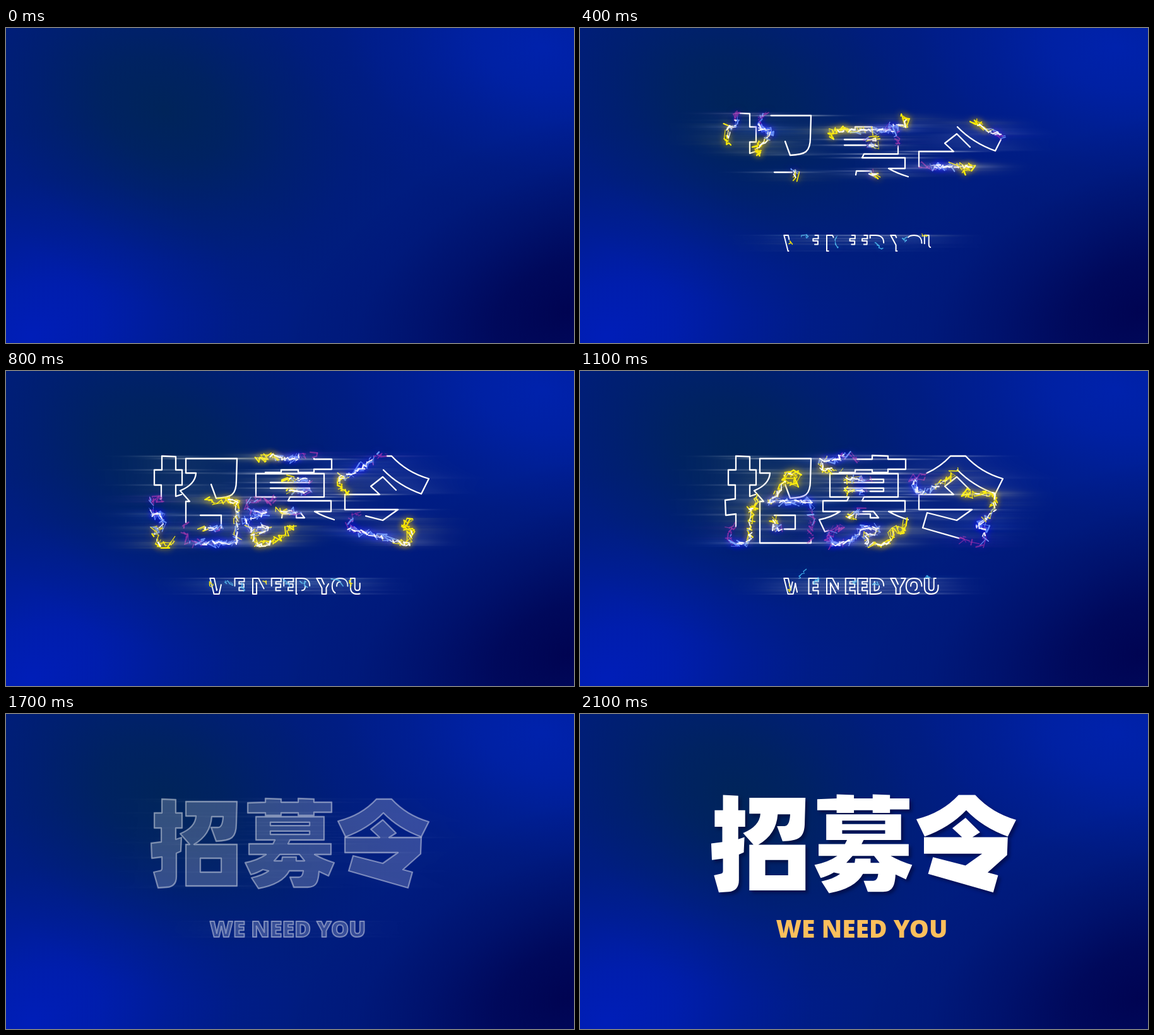
Recreate the animation shown at these times as an HTML page with a canvas. Size 900 px wide and 500 px high, loop 3.1 s.

```html
<!DOCTYPE html>
<html lang="zh">
<head>
<meta charset="utf-8">
<title>招募令</title>
<style>
  html, body { margin: 0; width: 100%; height: 100%; overflow: hidden; background: #001c80; }
  canvas, svg { position: absolute; left: 0; top: 0; }
  #rays { filter: url(#smear); mix-blend-mode: screen; }
</style>
</head>
<body>
<svg width="0" height="0">
  <filter id="smear" color-interpolation-filters="sRGB">
    <feGaussianBlur stdDeviation="38 0.4"/>
  </filter>
</svg>
<canvas id="stage" width="900" height="500" role="img" aria-label="招募令 WE NEED YOU"></canvas>
<canvas id="rays" width="900" height="500"></canvas>
<script>
const LOOP = 3100, STEP = 100, BOLT = 0.34;
const ctx = document.getElementById('stage').getContext('2d');
const rays = document.getElementById('rays').getContext('2d');
const ink = new OffscreenCanvas(900, 500).getContext('2d');
const clamp = v => Math.max(0, Math.min(1, v));

// Each outline starts where its stroke starts to be drawn.
const contours = [
  // 招
  'M278 196L269 199V181H279V157H269V136L247 135V157H235V181H246V203L230 205L231 229L247 227V245Q247 249 243 249L234 251L241 276L255 275Q270 274 270 258V221L277 218Z',
  'M325 180L333 202C357 201 365 197 365 174L366 139H285V162H301Q300 180 276 190L291 207H285V273H366V207H298Q324 192 326 163H344Q343 180 336 180Z',
  'M308 229H341V251H308Z',
  // 募
  'M411 161H436V157H463V161H488V156H516V140H488V135L463 134V140H436V135L411 134V140L383 141V157H411Z',
  'M520 236Q503 231 489 223H515V206H447L450 200H504V163H396V200H426L423 206H385V223H412Q399 232 379 236L388 255Q399 252 407 247L416 249Q407 256 389 260L400 277Q438 270 449 249H471Q470 259 464 259H450L456 275H478C492 275 495 266 496 250L511 257Z',
  'M419 177H481V172H419Z',
  'M419 186H481V191H419Z',
  'M437 233L438 227H460V233H473L465 223H434L425 233Z',
  // 令
  'M598 157Q622 182 658 195L670 171Q635 161 611 135H587Q563 161 526 170L538 195Q574 182 598 157Z',
  'M618 189L597 168L578 183L592 196H537V220H621L597 237L550 225L543 249L637 276L644 251L629 247L657 222L658 196H607Z'
].map(d => {
  const node = document.createElementNS('http://www.w3.org/2000/svg', 'path');
  node.setAttribute('d', d);
  return { node, path: new Path2D(d), length: node.getTotalLength() };
});
const title = new Path2D();
contours.forEach(c => title.addPath(c.path));

function randomizer(seed) {
  return () => {
    seed = (seed * 1664525 + 1013904223) >>> 0;
    return seed / 4294967296;
  };
}

function lobe(x, y, rx, ry, angle, rgb) {
  ctx.save();
  ctx.translate(x, y);
  ctx.rotate(angle);
  ctx.scale(rx, ry);
  const g = ctx.createRadialGradient(0, 0, 0, 0, 0, 1);
  [1, 0.8, 0.42, 0.12, 0].forEach((a, i) => g.addColorStop(i / 4, `rgba(${rgb},${a})`));
  ctx.fillStyle = g;
  ctx.fillRect(-1, -1, 2, 2);
  ctx.restore();
}

function background() {
  ctx.fillStyle = '#001c80';
  ctx.fillRect(0, 0, 900, 500);
  lobe(40, 490, 450, 320, -0.35, '0,30,184');
  lobe(850, 30, 430, 270, 0.2, '0,34,172');
  lobe(250, 130, 410, 300, 0.5, '0,36,90');
  lobe(890, 450, 470, 300, -0.35, '0,4,82');
}

function segment(a, b, color, width, glow) {
  ink.strokeStyle = color;
  ink.lineWidth = width;
  ink.shadowColor = glow;
  ink.shadowBlur = 12;
  ink.beginPath();
  ink.moveTo(...a);
  ink.lineTo(...b);
  ink.stroke();
}

// Colour runs from violet at the tail through blue to yellow at the tip.
function boltColor(u) {
  if (u < 0.22) return ['rgba(165,50,165,.65)', '#5020c0'];
  if (u < 0.6) return ['rgba(110,160,255,.9)', '#3038ff'];
  return ['#fff000', '#d0b000'];
}

function bolt({ node, length }, front, span, rnd) {
  const end = Math.min(1, front + span) * length;
  for (let strand = 0; strand < 5; strand++) {
    const core = strand > 2;
    const spread = core ? 6 : 7 + strand * 4;
    let last = null;
    for (let d = front * length; d < end; d += 2.5 + rnd() * 3.5) {
      const p = node.getPointAtLength(d);
      const next = [p.x + (rnd() - 0.5) * spread, p.y + (rnd() - 0.5) * spread];
      const u = (d / length - front) / span;
      const [color, glow] = boltColor(u + (rnd() - 0.5) * 0.3);
      const visible = core ? u > 0.25 && u < 0.85 && rnd() < 0.6
                           : rnd() < (u < 0.22 ? 0.55 : 0.82);
      if (last && visible) segment(last, next, core ? '#fff' : color, 0.7 + rnd() * 1.8, glow);
      last = next;
    }
  }
}

function textSparks(t, rnd) {
  for (const x of [326, 346, 372, 400, 432, 463, 514, 545]) {
    if (rnd() < 0.2) continue;
    const color = t >= 1300 || rnd() < 0.4 ? '#f0d800' : 'rgba(70,185,240,.85)';
    let last = [x + rnd() * 8, 328 + rnd() * 14];
    for (let i = 0; i < 7; i++) {
      const next = [last[0] + (rnd() - 0.4) * 8, last[1] + (rnd() - 0.4) * 9];
      if (next[1] > 360) break;
      segment(last, next, color, 0.8 + rnd(), '#1870c0');
      last = next;
    }
  }
}

function slogan(target, method, size, baseline) {
  target.font = `800 ${size}px "Open Sans", "Noto Sans", sans-serif`;
  target.textAlign = 'center';
  target[method]('WE NEED YOU', 446.5, baseline);
}

function finished() {
  ctx.save();
  ctx.shadowColor = 'rgba(0,0,40,.5)';
  ctx.shadowBlur = 5;
  ctx.shadowOffsetX = ctx.shadowOffsetY = 4;
  ctx.translate(450, 206.5);
  ctx.scale(1.098, 1.098);
  ctx.translate(-450.5, -206);
  ctx.fillStyle = '#fff';
  ctx.fill(title, 'evenodd');
  ctx.restore();
  ctx.fillStyle = '#fbbf5c';
  slogan(ctx, 'fillText', 39, 355);
}

function drawInk(t) {
  const front = clamp(0.02 + 0.00058 * t);
  const span = Math.min(BOLT, t * 0.00042);
  ink.clearRect(0, 0, 900, 500);
  ink.save();
  ink.lineJoin = ink.lineCap = 'round';
  ink.strokeStyle = '#fff';
  ink.globalAlpha = clamp(1 - (t - 1310) * 0.0015);
  ink.lineWidth = 2.3;
  for (const c of contours) {
    ink.setLineDash(front < 1 ? [c.length * front, c.length] : []);
    ink.stroke(c.path);
  }
  ink.lineWidth = 2;
  ink.setLineDash(t < 1300 ? [front * 160, 999] : []);
  ink.lineDashOffset = -50 * clamp((1300 - t) / 900);
  slogan(ink, 'strokeText', 35.5, 354);

  ink.setLineDash([]);
  ink.globalAlpha = clamp((1900 - t) / 600);
  const rnd = randomizer(t * 31 + 5);
  for (const c of contours) bolt(c, front, span, rnd);
  if (t < 1600) textSparks(t, rnd);
  ink.restore();
}

function outlined(t) {
  ctx.fillStyle = '#fff';
  ctx.globalAlpha = clamp((t - 1600) / 500);
  ctx.fill(title, 'evenodd');
  slogan(ctx, 'fillText', 35.5, 354);
  ctx.globalAlpha = 1;

  drawInk(t);
  ctx.drawImage(ink.canvas, 0, 0);
  rays.globalAlpha = 0.75 * clamp((1900 - t) / 800);
  rays.drawImage(ink.canvas, 0, 0);
}

function draw(t) {
  rays.clearRect(0, 0, 900, 500);
  background();
  if (t >= 2100) finished();
  else if (t > 0) outlined(t);
}

let shown = -1;
function tick() {
  const t = Math.floor((performance.now() % LOOP) / STEP) * STEP;
  if (t !== shown) draw(shown = t);
  requestAnimationFrame(tick);
}
tick();
</script>
</body>
</html>
```
